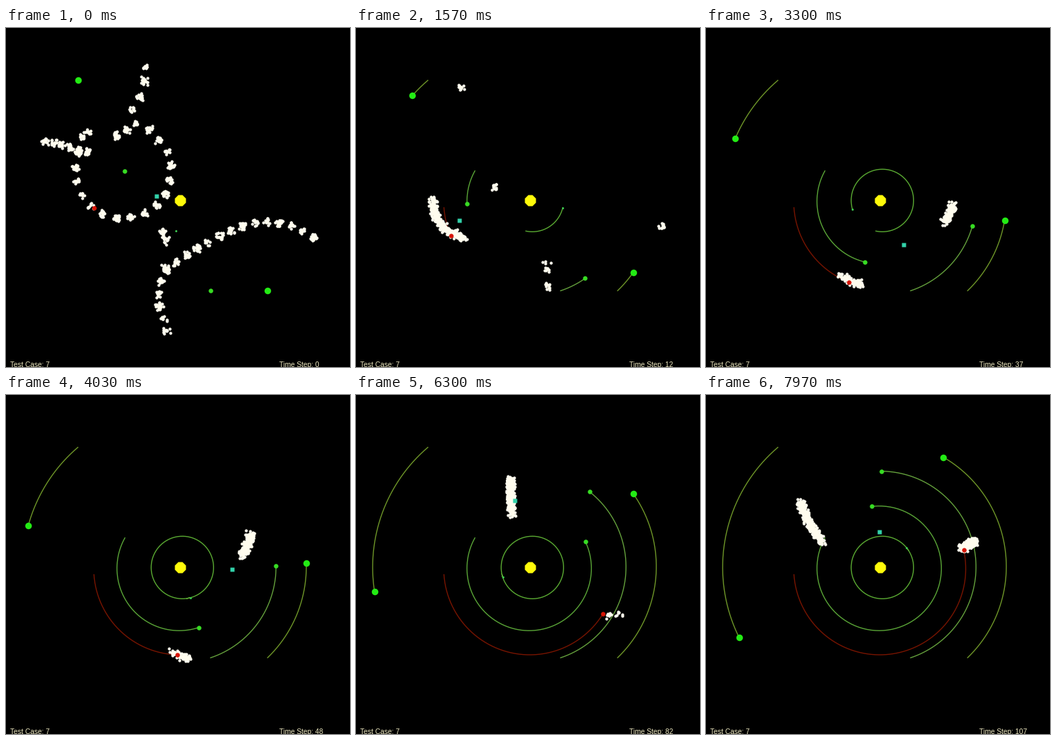
These frames come from a looping animation (496x488 px, 8 s). A matplotlib script:

```python
import numpy as np
import matplotlib.pyplot as plt
from matplotlib.animation import FuncAnimation

W, H, DPI = 496, 488, 100
FRAMES, INTERVAL = 200, 40
PX = 72 / DPI
SUN = np.array([251, 248])

# Simulation clock: a slow start, then a steady pace (ms, step).
CLOCK = ([0, 800, 1560, 4000, 7960], [0, 5.3, 12.2, 48.7, 107.7])

# centre, radius, start angle, dot size, dot colour, trail colour
ORBITS = [
    ((254.3, 248.3), 45, -102, 3, "#3cc850", "#5aaa32"),
    ((249.7, 249.5), 89.7, 150.8, 6.5, "#37dc23", "#5aa537"),
    ((250.5, 250), 124, 184, 6.5, "#d71405", "#781400"),
    ((251.5, 247.5), 137.8, -71.6, 6.5, "#37dc23", "#64a03c"),
    ((251, 247), 182, -46.1, 9.5, "#23eb14", "#6e9628"),
    ((251, 248), 227, 130.5, 9.5, "#23eb14", "#6e9628"),
]
RED = ORBITS[2]

# Clumps that outlive the others: place at step 0 and at step 11
LASTING = [((200, 75), (152, 86)), ((237, 198), (201, 229)),
           ((443, 302), (441, 286)), ((219, 402), (276, 372))]
LASTING_END = 16

rng = np.random.default_rng(7)


def rate(r):
    """Degrees per step on a circular orbit (Kepler's third law)."""
    return 2431 / r**1.5


def polar(ang, r, centre=SUN):
    a = np.radians(ang)
    return np.stack([centre[0] + r * np.cos(a), centre[1] - r * np.sin(a)], -1)


def smooth(x):
    x = np.clip(x, 0, 1)
    return x * x * (3 - 2 * x)


def spaced(points, n):
    """n places at even distances along a line through the points."""
    pts = np.array(points, float)
    dist = np.append(0, np.cumsum(np.hypot(*np.diff(pts, axis=0).T)))
    t = np.linspace(0, dist[-1], n)
    return np.stack([np.interp(t, dist, c) for c in pts.T], -1)


def scatter(n, spread):
    return np.clip(rng.normal(0, spread, (n, 2)), -1.8 * spread, 1.8 * spread)


def make_clumps():
    places = np.concatenate([
        polar(np.linspace(159, 434, 17), 69, (169, 205)),
        spaced([(202, 56), (198, 92), (181, 118)], 4),
        spaced([(174, 146), (158, 155)], 2),
        spaced([(56, 163), (90, 171), (117, 178)], 6),
        spaced([(109, 155), (120, 149)], 2),
        spaced([(226, 295), (230, 306)], 2),
        spaced([(232, 435), (218, 385), (229, 350), (268, 320), (331, 288),
                (365, 277), (408, 282), (443, 302)], 19),
    ])
    clumps = []
    for x, y in places:
        dx, dy = x - SUN[0], SUN[1] - y
        feeds_red = x < 160 and y > 165
        life = rng.uniform(9, 11) if feeds_red else rng.uniform(3, 10)
        dust = scatter(rng.integers(8, 22), 2.7)
        clumps.append((np.degrees(np.arctan2(dy, dx)), np.hypot(dx, dy), life, dust))
    return clumps


CLUMPS = make_clumps()
LASTING_DUST = [scatter(12, 2.6) for _ in LASTING]
ALONG = rng.uniform(-1, 1, (2, 500))
ACROSS = [scatter(500, 3) for _ in range(2)]


def cloud(i, n, ang, r, da, dr, bow):
    """A streak of n particles with half spans da, dr and a bulge."""
    s = ALONG[i, : int(n)]
    return polar(ang + s * da, r + s * dr + bow * (1 - s**2)) + ACROSS[i][: int(n)]


def red_cloud(p):
    n = 500 * np.exp(-p / 24) * min(1, p / 11) + 270 * max(0, (p - 82) / 25)
    ang = RED[2] + rate(RED[1]) * p + 2 - 30 * np.exp(-p / 11)
    r = 130 - 10 * np.cos(2 * np.pi * (p - 26) / 112)
    return cloud(0, n, ang, r, 21 * np.exp(-p / 38),
                 12 - 42 * np.exp(-p / 28), 20 * np.exp(-p / 18))


def inner_cloud(p):
    n = 12 + 340 * smooth((p - 18) / 50)
    ang = np.interp(p, [0, 26, 69, 82, 107], [258, 319.5, 434, 465.5, 508.2])
    grow = min(1, p / 26) ** 2
    da = 7.5 * np.cos((p - 40) / 21)
    dr = 33 - 78 * np.exp(-p / 38)
    return cloud(1, n, ang, 101 + 19 * (p / 107) ** 5, grow * da, grow * dr, 0)


def particles(p, seed):
    parts = [red_cloud(p), inner_cloud(p)]
    for ang, r, life, dust in CLUMPS:
        if p < life:
            parts.append(polar(ang + min(rate(r), 5) * p, r) + dust)
    if p < LASTING_END:
        for (a, b), dust in zip(np.array(LASTING), LASTING_DUST):
            parts.append(a + (b - a) * p / 11 + dust)
    pts = np.concatenate(parts)
    return pts + np.random.default_rng(seed).normal(0, 0.5, pts.shape)


fig = plt.figure(figsize=(W / DPI, H / DPI), dpi=DPI, facecolor="black")
ax = fig.add_axes([0, 0, 1, 1])
ax.set(xlim=(0, W), ylim=(H, 0))
ax.axis("off")


def dots(marker, size, color, z):
    return ax.plot([], [], marker, ms=size * PX, mfc=color, mec="none", zorder=z)[0]


trails = [ax.plot([], [], color=o[5], lw=1.4 * PX, zorder=1)[0] for o in ORBITS]
planets = [dots("o", o[3], o[4], 4) for o in ORBITS]
sun = dots("8", 17, "#fffa0a", 4)
sun.set_data([SUN[0]], [SUN[1]])
dust_dots = dots("o", 4.3, "#fffcee", 2)
guess = dots("s", 5.4, "#32d2aa", 5)
style = dict(family="Liberation Sans", size=10.3 * PX, color="#ebe6be", va="baseline")
ax.text(6.5, 487.5, "Test Case: 7", **style)
label = ax.text(394, 487.5, "", **style)


def draw(frame):
    u = np.interp(frame * INTERVAL, *CLOCK)
    # The labels lead the planets by half a step.
    label.set_text(f"Time Step: {int(u)}")
    p = max(0, int(np.floor(u - 0.5)))
    for (centre, r, start, *_), trail, planet in zip(ORBITS, trails, planets):
        t = np.linspace(max(0, p - 366 / rate(r)), p, 160)
        path = polar(start + rate(r) * t, r, centre)
        trail.set_data(*path.T)
        planet.set_data(*path[-1:].T)
    pts = particles(p, int(2 * u))
    dust_dots.set_data(*pts.T)
    guess.set_data(*pts.mean(axis=0, keepdims=True).T)
    return []


anim = FuncAnimation(fig, draw, frames=FRAMES, interval=INTERVAL, repeat=True)
plt.show()
```
